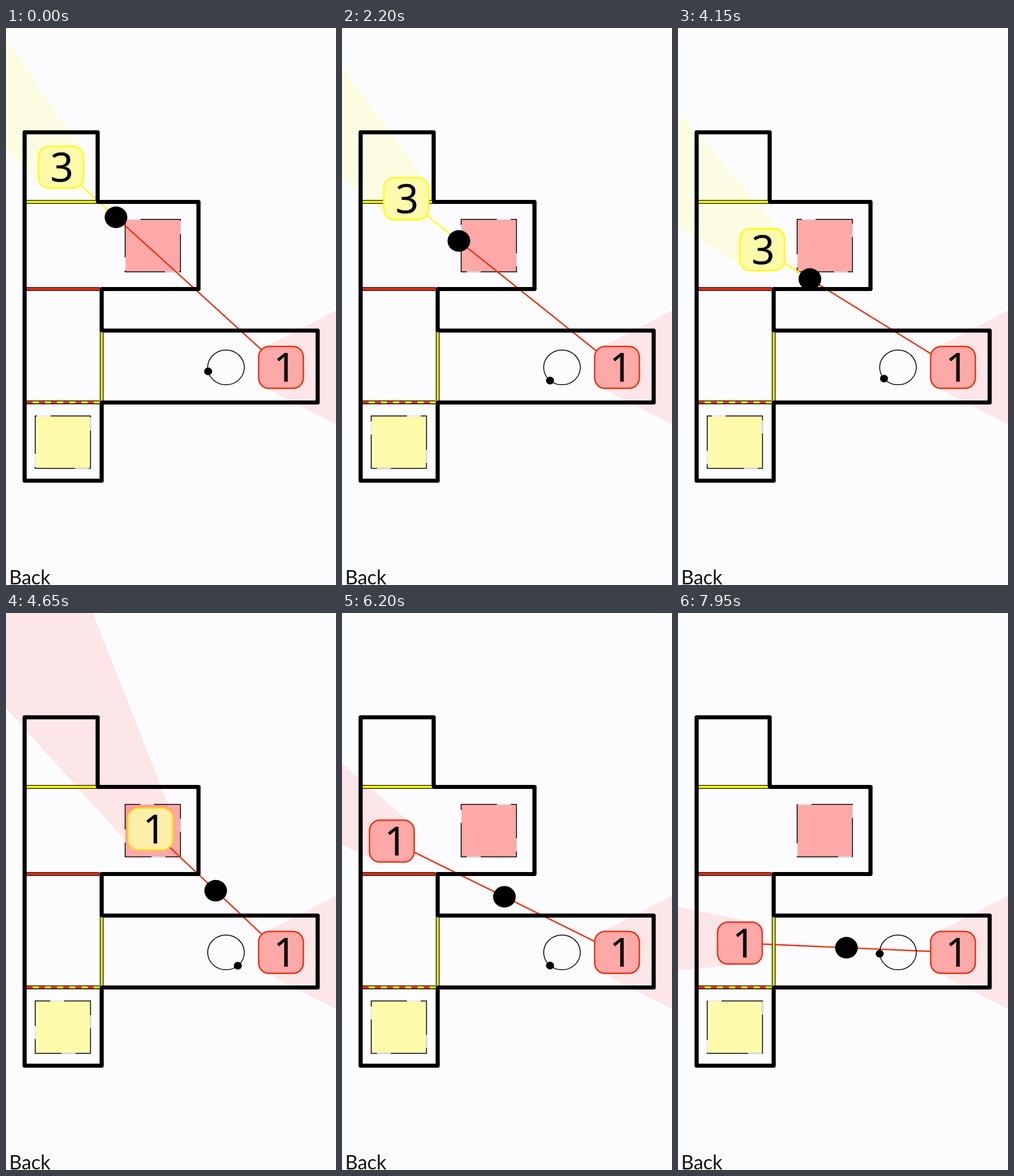
These frames come from a looping animation (576x972 px, 8 s). An HTML page:

```html
<!DOCTYPE html>
<html lang="en">
<head>
<meta charset="utf-8">
<title>Rooms</title>
<style>
  html, body { margin: 0; width: 100%; height: 100%; overflow: hidden; background: #fcfcff; }
  svg { display: block; width: 576px; height: 972px; }
  .digit { font: 70px "Open Sans", "Noto Sans", sans-serif; text-anchor: middle; stroke: #000; stroke-width: .5; }
  .back { font: 34px Lato, sans-serif; fill: #111; }
  .wall { fill: none; stroke: #000; stroke-width: 7.2; stroke-linejoin: round; }
  .link { stroke-width: 2.4; }
</style>
</head>
<body>
<svg id="stage" viewBox="0 0 576 972"></svg>
<script>
const LOOP = 8000;
const RED = [240, 48, 16], YELLOW = [255, 255, 0];
const PINK = [255, 168, 168], CREAM = [253, 250, 170];
const RED_SHADE = 'rgba(255,20,0,.09)', YELLOW_SHADE = 'rgba(255,255,0,.11)';
const LIGHT = { x: 384, y: 592.3 };
const FIXED = { x: 480, y: 592.3 };
const BOX = { w: 78, h: 73, r: 18 };
const SWAP = 4600, FADE = 350;

// time, x, y of the dragged box
const PATH = [
  [0, 96, 243], [1750, 96, 243], [2200, 112, 298], [2550, 104, 333],
  [3400, 86, 415], [4250, 155, 383], [4600, 250, 377], [4650, 252, 377],
  [4800, 252, 377], [5100, 184, 384], [5950, 115, 387], [6200, 87, 398],
  [6850, 84, 439], [7950, 108, 576], [8000, 108, 578]
];

const stage = document.getElementById('stage');
const rgb = c => `rgb(${c.map(Math.round)})`;
const mix = (a, b, k) => a + (b - a) * k;
const mixColor = (a, b, k) => a.map((v, i) => mix(v, b[i], k));

function set(node, attrs) {
  for (const key in attrs) node.setAttribute(key, attrs[key]);
  return node;
}
function add(tag, attrs, parent = stage) {
  const node = document.createElementNS('http://www.w3.org/2000/svg', tag);
  return parent.appendChild(set(node, attrs));
}
const line = (x1, y1, x2, y2, attrs) => add('line', { x1, y1, x2, y2, ...attrs });

// Square whose border has one pale stretch sliding along each side
function target(x, y, fill) {
  const w = 96.5, h = 91.5, part = 0.25;
  add('rect', { x, y, width: w, height: h, fill: rgb(fill), stroke: '#000', 'stroke-width': 1.5 });
  const gaps = [0, 1, 2, 3].map(() => line(0, 0, 0, 0, { stroke: '#e9e4ee', 'stroke-width': 2 }));
  return k => {
    const a = k * (1 - part), b = a + part;
    const sides = [
      [x + a * w, y, x + b * w, y],
      [x + w, y + a * h, x + w, y + b * h],
      [x + w - a * w, y + h, x + w - b * w, y + h],
      [x, y + h - a * h, x, y + h - b * h]
    ];
    sides.forEach(([x1, y1, x2, y2], i) => set(gaps[i], { x1, y1, x2, y2 }));
  };
}

function door(x1, y1, x2, y2, color, dashes) {
  line(x1, y1, x2, y2, { stroke: '#000', 'stroke-width': 6.4 });
  line(x1, y1, x2, y2, { stroke: rgb(color), 'stroke-width': 3.8 });
  if (dashes) line(x1, y1, x2, y2, { stroke: rgb(RED), 'stroke-width': 3.8, 'stroke-dasharray': dashes });
}

function numberBox() {
  const g = add('g', {});
  const rect = add('rect', {
    x: -BOX.w / 2, y: -BOX.h / 2, width: BOX.w, height: BOX.h, rx: BOX.r, 'stroke-width': 2.5
  }, g);
  const text = add('text', { class: 'digit', y: 25 }, g);
  return (pos, value, fill, stroke) => {
    set(g, { transform: `translate(${pos.x} ${pos.y})` });
    set(rect, { fill: rgb(fill), stroke: rgb(stroke) });
    set(text, { x: value === 1 ? 7 : 1.5 });
    text.textContent = value;
  };
}

// Shadow cast by a rounded box: tangents from the light to its corner arcs
function shadowPoints(pos) {
  const axis = Math.atan2(pos.y - LIGHT.y, pos.x - LIGHT.x);
  const tangents = [];
  for (const sx of [-1, 1]) for (const sy of [-1, 1]) {
    const dx = pos.x + sx * (BOX.w / 2 - BOX.r) - LIGHT.x;
    const dy = pos.y + sy * (BOX.h / 2 - BOX.r) - LIGHT.y;
    const d = Math.hypot(dx, dy), raw = Math.atan2(dy, dx) - axis;
    const rel = Math.atan2(Math.sin(raw), Math.cos(raw));
    const spread = Math.asin(BOX.r / d), reach = Math.sqrt(d * d - BOX.r ** 2);
    tangents.push({ a: rel - spread, reach }, { a: rel + spread, reach });
  }
  tangents.sort((p, q) => p.a - q.a);
  const lo = tangents[0], hi = tangents[tangents.length - 1];
  const at = (a, d) => [LIGHT.x + d * Math.cos(axis + a), LIGHT.y + d * Math.sin(axis + a)];
  return [at(lo.a, lo.reach), at(lo.a, 1600), at(hi.a, 1600), at(hi.a, hi.reach)].join(' ');
}

const slidePink = target(208, 334, PINK);
const slideCream = target(51, 677, CREAM);
const shadow = add('polygon', {});
add('polygon', { points: shadowPoints(FIXED), fill: RED_SHADE });
const nearLink = add('line', { class: 'link' });
const farLink = add('line', { class: 'link', stroke: rgb(RED) });

add('path', {
  class: 'wall',
  d: 'M32.5 182H160V303.5H336V455.5H167V528H544V653.5H167V790H32.5Z'
});
door(36, 303.5, 157, 303.5, YELLOW);
door(36, 455.5, 163.5, 455.5, RED);
door(167, 531, 167, 650, YELLOW);
door(36, 653.2, 163.5, 653.2, YELLOW, '10.6 10.7');

add('ellipse', { cx: LIGHT.x, cy: LIGHT.y, rx: 32, ry: 30.3, fill: 'none', stroke: '#000', 'stroke-width': 1.5 });
const moon = add('ellipse', { rx: 7, ry: 6.7 });
const ball = add('ellipse', { rx: 19.8, ry: 18.8 });
const drawFixed = numberBox();
const drawMoving = numberBox();
add('text', { class: 'back', x: 5.5, y: 971 }).textContent = 'Back';
drawFixed(FIXED, 1, PINK, RED);

function boxAt(t) {
  const i = PATH.findIndex(step => step[0] > t);
  const [t0, x0, y0] = PATH[i - 1], [t1, x1, y1] = PATH[i];
  const k = (t - t0) / (t1 - t0);
  return { x: mix(x0, x1, k), y: mix(y0, y1, k) };
}

function render(t) {
  const pos = boxAt(t);
  const swapped = t >= SWAP;
  const k = Math.min(1, Math.max(0, (t - SWAP) / FADE));
  drawMoving(pos, swapped ? 1 : 3, mixColor(CREAM, PINK, k), mixColor(YELLOW, RED, k));
  set(shadow, { points: shadowPoints(pos), fill: swapped ? RED_SHADE : YELLOW_SHADE });

  // The ball hangs at the balance point of both numbers
  const share = swapped ? 0.5 : 0.25;
  const x = mix(pos.x, FIXED.x, share), y = mix(pos.y, FIXED.y, share);
  set(ball, { cx: x, cy: y });
  set(nearLink, { x1: pos.x, y1: pos.y, x2: x, y2: y, stroke: rgb(swapped ? RED : YELLOW) });
  set(farLink, { x1: x, y1: y, x2: FIXED.x, y2: FIXED.y });

  const angle = (167 - 0.18 * t) * Math.PI / 180;
  set(moon, { cx: LIGHT.x + 32 * Math.cos(angle), cy: LIGHT.y + 30.3 * Math.sin(angle) });

  const phase = (t + 75) % 4000 / 2000;
  const slide = phase < 1 ? phase : 2 - phase;
  slidePink(slide);
  slideCream(slide);
}

const start = performance.now();
function tick() {
  render((performance.now() - start) % LOOP);
  requestAnimationFrame(tick);
}
tick();
</script>
</body>
</html>
```
